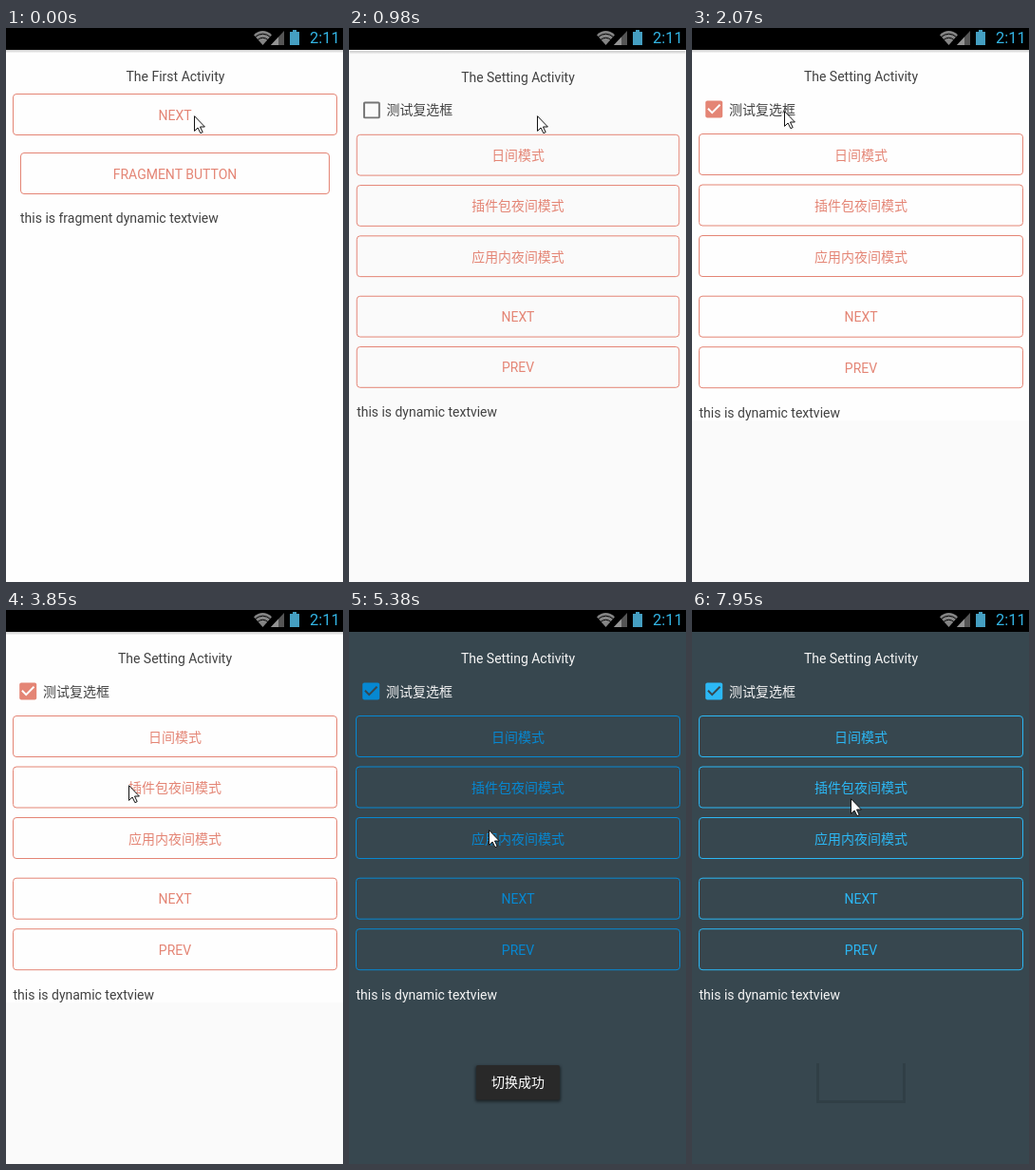
Animation of 355 by 583 pixels, one loop 8 s. Source, as an HTML page:

```html
<!DOCTYPE html>
<html lang="en">
<head>
<meta charset="utf-8">
<title>Theme switching</title>
<style>
  html, body { margin: 0; width: 100%; height: 100%; overflow: hidden; background: #000; }
  svg { display: block; width: 355px; height: 583px; }
  text { font: 14px Roboto, "Noto Sans CJK SC", "Noto Sans CJK", sans-serif; fill: var(--text); }
  .mid { text-anchor: middle; }
  .button rect { fill: none; stroke: var(--accent); }
  .button text { fill: var(--accent); text-anchor: middle; }
  #page { fill: var(--bg); }
</style>
</head>
<body>
<svg id="stage" viewBox="0 0 355 583">
  <defs>
    <linearGradient id="edge" x2="0" y2="1">
      <stop stop-opacity=".2"/><stop offset="1" stop-opacity="0"/>
    </linearGradient>
    <filter id="blur" x="-20%" y="-30%" width="140%" height="170%"><feGaussianBlur stdDeviation="1.6"/></filter>
    <rect id="shade" y="23" width="355" height="3.5" fill="url(#edge)"/>
  </defs>
  <rect id="page" y="23" width="355" height="560"/>
  <rect id="lower" y="413" width="355" height="170" fill="#fafafa"/>

  <g id="first">
    <use href="#shade"/>
    <text class="mid" x="178.5" y="56">The First Activity</text>
    <text x="15" y="205">this is fragment dynamic textview</text>
  </g>

  <rect id="sheet" y="23" width="355" height="560" fill="#fafafa"/>
  <g id="setting">
    <use id="settingShade" href="#shade"/>
    <text class="mid" x="178" y="56">The Setting Activity</text>
    <circle id="ripple" cx="23.5" cy="85.5"/>
    <rect id="unchecked" x="15.2" y="77.5" width="16" height="16" rx="1" fill="none" stroke="#757575" stroke-width="2"/>
    <g id="checked">
      <rect x="14.2" y="76.5" width="18" height="18" rx="2" fill="var(--accent)"/>
      <path d="M16.9 84.8l4.3 4.3 8.3-8.3" fill="none" stroke="var(--bg)" stroke-width="2"/>
    </g>
    <text x="39" y="90.5">测试复选框</text>
    <text x="7.5" y="410">this is dynamic textview</text>
  </g>

  <g id="toast">
    <rect x="133" y="480" width="90" height="37.5" rx="2" opacity=".5" filter="url(#blur)"/>
    <rect x="134" y="479" width="88" height="36.5" rx="2" fill="#292929"/>
    <text class="mid" x="178" y="502" style="fill:#fff">切换成功</text>
  </g>
  <path id="residue" d="M132.5 477V517.5H223.5V477" fill="none" stroke="#303f46" stroke-width="3"/>

  <rect width="355" height="23" fill="#000"/>
  <path d="M270.5 18L261 7.2Q270.5-1 280 7.2Z" fill="#858585"/>
  <path d="M262 9.8Q270.5 2.6 279 9.8M264.4 13Q270.5 7.6 276.6 13" fill="none" stroke="#000"/>
  <path d="M293 3v15h-14z" fill="#555"/>
  <path d="M287 9.4V18h-8z" fill="#949494"/>
  <path d="M302 2h4v2h3v14h-10V4h3z" fill="#459fc2"/>
  <text x="320" y="16.4" style="font-size:16.4px;fill:#33b5e5">2:11</text>

  <path id="cursor" d="M.5 .7V16.4L4.1 13l2.8 5.7 2.3-1.1L6.5 12H11.4Z" fill="#fff" stroke="#111"/>
</svg>
<script>
const LOOP = 8000, FRAME = 136;
const $ = id => document.getElementById(id);
const NS = "http://www.w3.org/2000/svg";

function make(parent, tag, attrs) {
  const node = parent.appendChild(document.createElementNS(NS, tag));
  for (const key in attrs) node.setAttribute(key, attrs[key]);
  return node;
}

function addButton(parent, label, y, x = 7.5) {
  const group = make(parent, "g", { class: "button" });
  make(group, "rect", { x, y, width: 356 - 2 * x, height: 43, rx: 3.5 });
  make(group, "text", { x: 178, y: y + 27 }).textContent = label;
}

addButton($("first"), "NEXT", 69.5);
addButton($("first"), "FRAGMENT BUTTON", 131.5, 15.5);
["日间模式", "插件包夜间模式", "应用内夜间模式"].forEach((label, i) => addButton($("setting"), label, 111.5 + 53.5 * i));
["NEXT", "PREV"].forEach((label, i) => addButton($("setting"), label, 282.2 + 53.5 * i));

const light = { bg: "#fefefe", accent: "#e48575", text: "#424242" };
const grey = { bg: "#404040", accent: "#0688d2", text: "#f5f5f5" };
const slate = { ...grey, bg: "#37474f" };
const bright = { ...slate, accent: "#2cb8f5" };

function progress(t, start, end) {
  if (t < start) return 0;
  const steps = Math.max(1, Math.round((end - start) / FRAME));
  return Math.min(1, (Math.floor((t - start) / (end - start) * steps + .1) + 1) / (steps + 1));
}

const easeOut = (p, power) => 1 - (1 - p) ** power;

const rest = { x: 198, y: 92 };
const moves = [
  { start: 1380, end: 1800, x: 97, y: 87 },
  { start: 3350, end: 3850, x: 129, y: 184 },
  { start: 5080, end: 5510, x: 148, y: 234 },
  { start: 7040, end: 7950, x: 167, y: 198 }
];

function cursorAt(t) {
  let { x, y } = rest;
  for (const move of moves) {
    // The last move dawdles: it covers its distance only as it ends.
    const late = move.end - move.start > 600;
    const p = late ? (t >= move.end ? 1 : .12 * (t >= move.start)) : easeOut(progress(t, move.start, move.end), 2);
    x += (move.x - x) * p;
    y += (move.y - y) * p;
  }
  return [x, y].map(Math.round);
}

const show = (id, on) => { $(id).style.display = on ? "" : "none"; };

function draw(t) {
  const theme = t < 4530 ? light : t < 4660 ? grey : t < 6250 ? slate : bright;
  for (const key in theme) $("stage").style.setProperty("--" + key, theme[key]);

  const entry = progress(t, 830, 1130);
  const scale = 1 - .12 * (1 - entry) ** 3;
  const alpha = Math.min(1, 2 * entry);
  $("setting").setAttribute("transform", `translate(177.7 291) scale(${scale}) translate(-177.7 -291)`);
  $("setting").setAttribute("opacity", alpha);
  $("sheet").setAttribute("opacity", alpha);
  show("first", alpha < 1);
  show("sheet", entry < 1);
  show("lower", entry === 1 && t < 4530);
  show("settingShade", t < 4530);

  const checked = t >= 1920;
  const press = progress(t, 1800, 2070);
  show("checked", checked);
  show("unchecked", !checked);
  $("ripple").setAttribute("r", press < 1 ? 15.5 * Math.min(1, 2 * press) : 0);
  $("ripple").setAttribute("fill", checked ? "#e4857540" : "#00000020");

  $("toast").setAttribute("opacity", progress(t, 4660, 5080) - progress(t, 6620, 7040));
  show("residue", t >= 7040);
  $("cursor").setAttribute("transform", `translate(${cursorAt(t)})`);
}

const begin = performance.now();
function tick() {
  draw((performance.now() - begin) % LOOP);
  requestAnimationFrame(tick);
}
tick();
</script>
</body>
</html>
```
